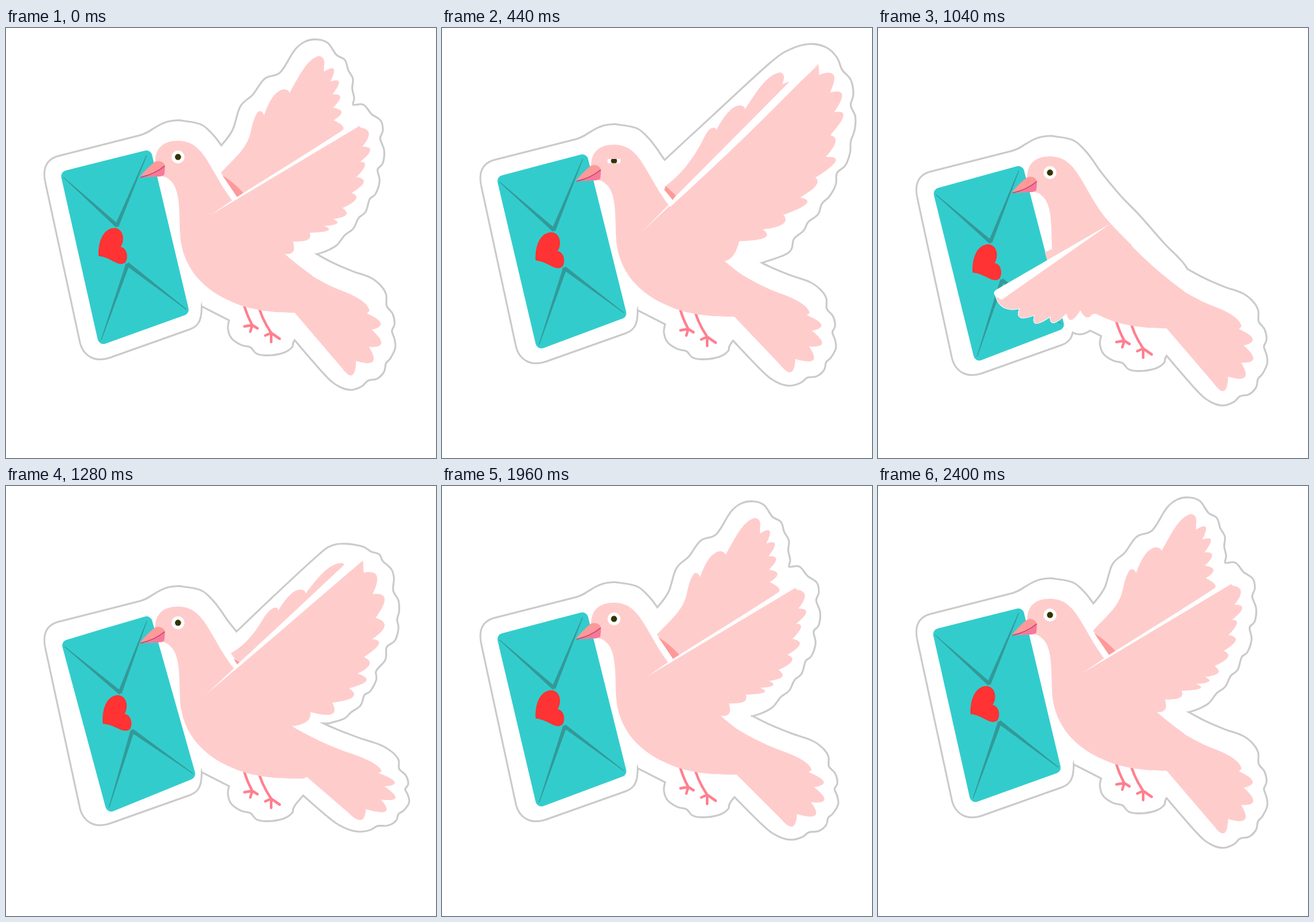
Animation of 660x660 px, one loop 2440 ms. Source, as an HTML page with a canvas:

```html
<!DOCTYPE html>
<html lang="en">
<head>
<meta charset="utf-8">
<title>Dove with a letter</title>
<style>
html, body { margin: 0; width: 100%; height: 100%; overflow: hidden; background: #fff; }
canvas { display: block; width: 660px; height: 660px; }
</style>
</head>
<body>
<canvas id="stage" width="660" height="660"></canvas>
<script>
const ctx = document.getElementById('stage').getContext('2d');
const STEP = 40, FRAMES = 61;
const PINK = '#ffcccc', SALMON = '#ff9999', TEAL = '#33cccc', CREASE = '#339999',
  RED = '#ff3333', LEG = '#ff7f8f', LINE = '#cacaca', WHITE = '#fff';

const mix = (a, b, t) => [a[0] + (b[0] - a[0]) * t, a[1] + (b[1] - a[1]) * t];
const pairs = text => text.trim().split(/\s+/).map(p => p.split(',').map(Number));

// Smooth curve through every point, closed through the inner points.
function outline(text, inner = '') {
  const pts = pairs(text), path = new Path2D();
  path.moveTo(...pts[0]);
  for (let i = 0; i < pts.length - 1; i++) {
    const a = pts[i], b = pts[i + 1], before = pts[i - 1] || a, after = pts[i + 2] || b;
    path.bezierCurveTo(
      a[0] + (b[0] - before[0]) / 6, a[1] + (b[1] - before[1]) / 6,
      b[0] - (after[0] - a[0]) / 6, b[1] - (after[1] - a[1]) / 6, ...b);
  }
  if (inner) pairs(inner).forEach(p => path.lineTo(...p));
  path.closePath();
  return path;
}

// Rounded feather ends between two points, notched towards the root.
function feathers(path, start, text, end, root, depth) {
  const tips = pairs(text);
  let from = start;
  path.lineTo(...start);
  tips.forEach((tip, i) => {
    let to = end;
    if (i < tips.length - 1) {
      const mid = mix(tip, tips[i + 1], 0.5);
      to = mix(mid, root, depth / Math.hypot(mid[0] - root[0], mid[1] - root[1]));
    }
    const base = mix(from, to, 0.5);
    path.quadraticCurveTo(2 * tip[0] - base[0], 2 * tip[1] - base[1], ...to);
    from = to;
  });
}

function feathered(head, start, text, end, root, depth, close = '') {
  const path = new Path2D(head);
  feathers(path, start, text, end, root, depth);
  path.addPath(new Path2D());
  if (close) pairs(close).forEach(p => path.lineTo(...p));
  path.closePath();
  return path;
}

const bodyOutline = outline(
  `266,143 298,149 316,164 328,179 342,199 372,235 400,264 438,307 474,347 480,390 470,440
   442,478 438,489 426,497 405,501 386,499 376,489 361,485 347,475 342,461 344,448`,
  '301,426') ;
const letterOutline = new Path2D(
  `M62,238 C57,216 63,203 80,198 L206,166 C228,160 234,143 266,143 L330,300 L299,425
   C299,446 296,456 282,461 L158,505 C136,512 120,502 115,483 Z`);
const tailOutline = outline(
  `474,347 500,361 530,374 558,384 573,395 582,409 583,427 592,439 595,454 591,465 595,478
   596,491 589,506 582,514 579,527 569,537 555,540 545,549 529,554 510,548 490,531 443,477`,
  '425,420');
const foldOutline = new Path2D('M296,440 Q310,450 325,439 L342,446 L342,390 L290,390 Z');

const body = new Path2D(
  `M229,205 C229,184 242,173 264,173 C291,173 303,192 320,222 C334,247 346,265 357,276
   C385,307 420,344 470,380 L470,430 L457,437 C430,437 385,438 346,420
   C293,397 268,358 267,312 C266,278 267,245 251,233 Q246,228 240,228 Z`);
const tail = feathered('M410,335 C450,372 490,394 520,405 Q555,419 558,434',
  [554, 438], '575,453 576,484 563,512 531,533', [515, 521], [470, 430], 15, '443,437 410,430');
const heart = new Path2D(
  `M142,350 C141,330 148,309 165,307 C179,306 184,324 176,336 C187,338 188,354 183,360
   C172,368 162,352 142,350 Z`);

const poses = {
  high: {
    outline: outline(
      `322,190 331,182 349,157 361,121 380,103 398,79 422,69 444,35 460,22 477,19 493,24 506,42
       519,50 524,65 531,78 530,93 533,107 532,119 548,119 560,133 574,143 577,157 573,170 579,188
       577,207 569,217 572,235 566,254 557,262 551,281 540,291 532,307 519,317 507,332 491,341 476,346`,
      '360,340'),
    far: feathered(
      `M330,222 C355,195 370,185 376,158 C380,139 386,125 391,128 Q395,129 396,134
       Q409,96 427,94 Q435,95 435,100 C449,76 461,48 480,43 Q491,44 488,60`,
      [488, 67], '503,63 511,83 513,106 515,129 517,151', [515, 158], [430, 150], 13, '364,256 355,259'),
    base: new Path2D('M332,226 Q350,237 365,254 L355,260 Z'),
    gap: new Path2D('M314,287 L355,259 L518,157 L543,150 Z'),
    near: feathered('M314,287 L541,150', [545, 153],
      '557,162 559,188 551,211 549,237 537,263 522,287 508,300 494,311 463,325 440,344',
      [424, 346], [380, 290], 13, '440,370 340,370')
  },
  raised: {
    outline: outline(
      `320,218 341,199 420,126 504,49 535,28 564,20 589,25 605,40 613,59 626,74 630,95 626,113
       633,130 632,150 626,168 625,185 618,204 605,216 603,234 594,251 582,263 576,279 561,291
       554,304 539,317 535,333 523,342 488,354`, '360,345'),
    far: new Path2D(
      `M341,238 C369,218 386,193 399,169 Q408,148 416,147 Q421,147 421,151
       C434,127 447,111 460,113 Q465,115 465,119 C484,90 498,66 519,62
       Q529,65 522,80 L534,76 L357,254 Z`),
    base: new Path2D('M344,237 L359,251 L354,258 L341,242 Z'),
    gap: new Path2D('M306,308 L355,258 L534,76 L578,50 Z'),
    near: feathered('M306,308 Q440,190 562,64 Q574,49 578,50', [579, 66],
      '601,66 614,96 616,129 604,169 604,199 574,236 559,264 523,295 495,316 447,343',
      [433, 352], [400, 290], 17, '440,370 340,370')
  },
  level: {
    outline: outline(
      `330,236 350,217 415,155 479,96 500,81 520,78 546,82 560,90 572,94 577,104 590,116 594,129
       593,149 601,164 602,180 599,193 601,206 596,224 583,235 581,254 567,271 567,285 558,302
       549,308 543,324 529,334 518,344 495,351`, '360,350'),
    far: new Path2D(
      `M345,245 C371,230 386,207 397,188 Q409,172 416,175 Q418,176 418,179
       C432,156 445,143 457,148 Q460,150 460,153 C479,128 495,107 516,106
       Q521,108 517,112 L357,260 Z`),
    base: new Path2D('M349,253 L358,258 L355,262 Z'),
    gap: new Path2D('M306,309 L355,263 L519,109 L547,103 Z'),
    near: feathered('M306,309 Q420,213 532,115 Q547,101 548,103', [549, 121],
      '569,126 581,161 581,203 572,231 558,262 553,287 532,312 500,338 461,350',
      [436, 357], [400, 290], 16, '440,370 340,370')
  },
  down: {
    outline: foldOutline,
    gap: new Path2D('M357,276 L181,378 Q175,383 181,388 L190,393 Z'),
    near: feathered('M357,277 L192,384', [181, 388],
      '194,405 219,420 243,429 270,428 297,424 320,420', [329, 415], [320, 350], 13, '390,410 390,310')
  }
};

const wingCycle = ['high', 'down', 'down', 'level', 'level', 'raised'];
const triangle = (n, period) => Math.min(n % period, period - n % period);

function fill(path, color) {
  ctx.fillStyle = color;
  ctx.fill(path);
}

function skewed(path, s, stretch) {
  const out = new Path2D();
  out.addPath(path, new DOMMatrix(
    [1 + stretch * s, 0.1 * s, 0, 1 - 0.215 * s, -455 * stretch * s, 29.2 * s]));
  return out;
}

function drawOutline(paths) {
  ctx.strokeStyle = LINE;
  ctx.lineWidth = 5.6;
  paths.forEach(p => ctx.stroke(p));
  paths.forEach(p => fill(p, WHITE));
}

function crease(x1, y1, x2, y2) {
  const len = Math.hypot(x2 - x1, y2 - y1);
  const nx = (y2 - y1) / len, ny = (x1 - x2) / len;
  fill(new Path2D(`M${x1 + nx * .5},${y1 + ny * .5} L${x2 + nx * 3},${y2 + ny * 3}
    L${x2 - nx * 3},${y2 - ny * 3} L${x1 - nx * .5},${y1 - ny * .5} Z`), CREASE);
}

function drawLetter(angle) {
  ctx.save();
  ctx.translate(218, 192);
  ctx.rotate(-angle);
  ctx.translate(-218, -192);
  ctx.beginPath();
  ctx.moveTo(150, 204);
  [[222, 186, 282, 438], [282, 438, 143, 488], [143, 488, 83, 221], [83, 221, 222, 186]]
    .forEach(c => ctx.arcTo(...c, 9));
  ctx.closePath();
  ctx.fillStyle = TEAL;
  ctx.fill();
  crease(88, 229, 171, 304);
  crease(216, 195, 170, 304);
  crease(277, 432, 186, 362);
  crease(146, 479, 187, 362);
  fill(heart, RED);
  ctx.restore();
}

function drawLegs() {
  ctx.strokeStyle = LEG;
  ctx.lineWidth = 4;
  ctx.stroke(new Path2D(
    `M366,427 Q370,441 378,456 M366,458 L378,456 L386,461 M378,456 L375,466
     M387,423 Q391,444 407,468 M398,472 L407,468 L420,477 M407,468 L407,482`));
}

function drawHead(blink) {
  fill(new Path2D('M205,229 Q217,214 229,205 Q240,202 244,211 L243,225 Q240,228 232,228 Z'), SALMON);
  fill(new Path2D('M207,229 Q230,225 244,211 L243,225 Q240,228 232,228 Z'), '#f7799a');
  ctx.strokeStyle = '#c2456f';
  ctx.lineWidth = 1.6;
  ctx.stroke(new Path2D('M207,229 Q229,224 243,212'));

  ctx.save();
  if (blink) {
    ctx.beginPath();
    ctx.rect(250, 195, 28, 6.5);
    ctx.clip();
  }
  [[10, WHITE], [4.7, '#333300']].forEach(([r, color]) => {
    ctx.beginPath();
    ctx.arc(264, 198, r, 0, 7);
    ctx.fillStyle = color;
    ctx.fill();
  });
  ctx.restore();
}

function draw(n) {
  const wing = poses[wingCycle[Math.floor(n % 12 / 2)]];
  const sway = n < 52 ? triangle(n, 13) / 6 : 0;
  const blink = n < 52 && n % 13 > 10;

  ctx.fillStyle = WHITE;
  ctx.fillRect(0, 0, 660, 660);
  ctx.save();
  ctx.translate(0, 6 * triangle(n, 10));
  ctx.lineJoin = ctx.lineCap = 'round';

  drawOutline([letterOutline, bodyOutline, skewed(tailOutline, sway, 0.15), wing.outline]);
  drawLetter(triangle(n, 12) * 0.6 * Math.PI / 180);
  if (wing.far) {
    fill(wing.far, PINK);
    fill(wing.base, SALMON);
  } else {
    fill(new Path2D('M256,320 L268,315 L268,332 L260,334 Z'), PINK);
  }
  drawLegs();
  fill(skewed(tail, sway, 0.18), PINK);
  fill(body, PINK);
  drawHead(blink);
  if (!wing.far) {
    ctx.strokeStyle = WHITE;
    ctx.lineWidth = 2;
    ctx.save();
    ctx.beginPath();
    ctx.rect(170, 370, 115, 70);
    ctx.clip();
    ctx.stroke(wing.near);
    ctx.restore();
  }
  fill(wing.near, PINK);
  fill(wing.gap, WHITE);
  ctx.restore();
}

function tick() {
  draw(Math.floor(performance.now() / STEP) % FRAMES);
  requestAnimationFrame(tick);
}
tick();
</script>
</body>
</html>
```
